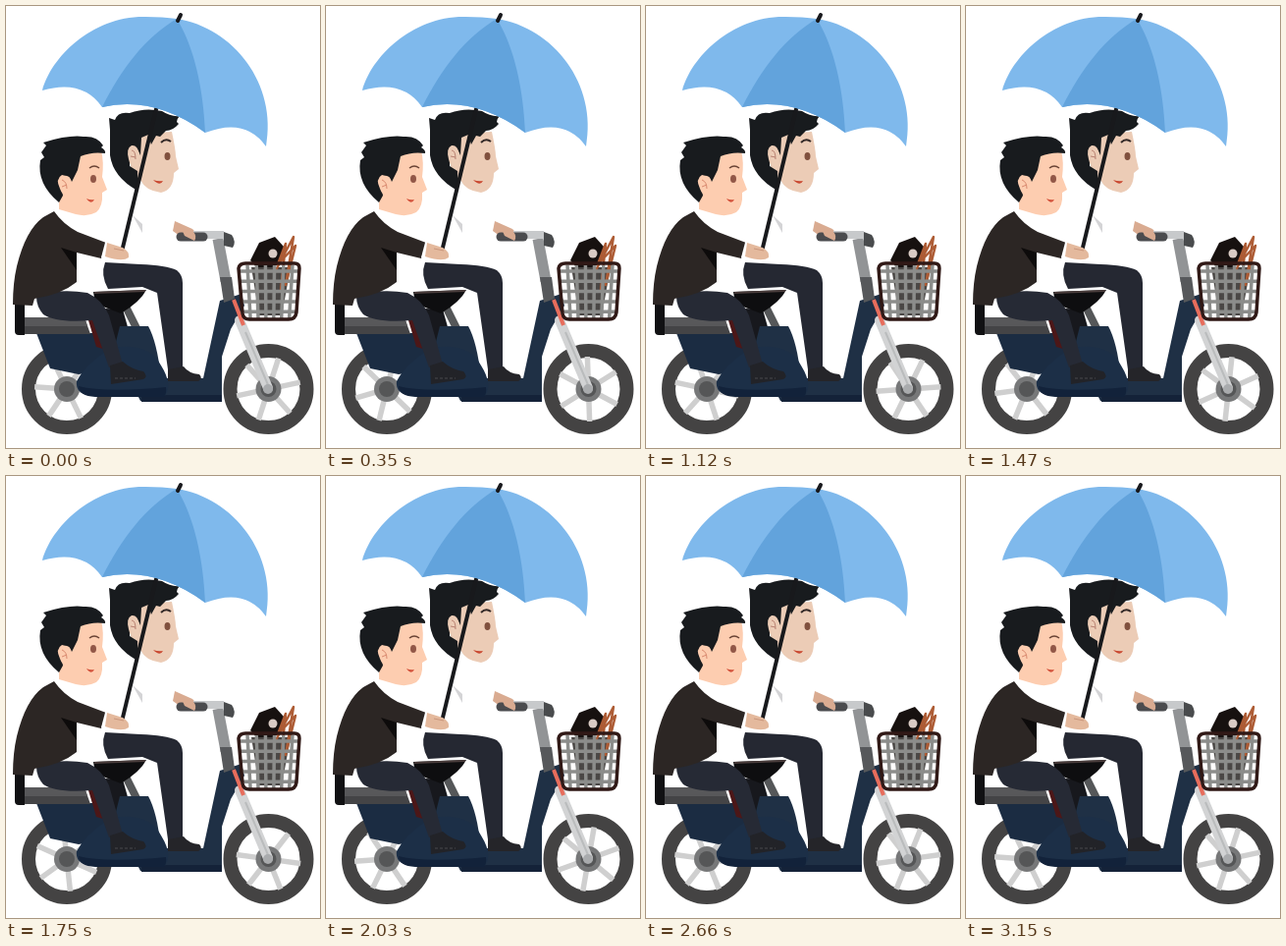
An HTML page that plays this animation: 320 px wide and 450 px high, repeating every 3.22 s.

```html
<!DOCTYPE html>
<html lang="en">
<head>
<meta charset="utf-8">
<title>Scooter ride</title>
<style>
html, body { margin: 0; width: 100%; height: 100%; overflow: hidden; background: #fff; }
svg { display: block; width: 100vw; height: 100vh; }
</style>
</head>
<body>
<svg viewBox="0 0 320 450" stroke-linejoin="round">
  <defs>
    <circle id="tyre" r="39" fill="#fff" stroke="#444343" stroke-width="14"/>
    <clipPath id="basketClip"><path d="M238 263H299L296 313Q295 319 288 319H248Q242 319 241 313Z"/></clipPath>
  </defs>

  <g id="wheels"></g>

  <!-- scooter -->
  <g id="scooter">
    <path d="M119 300L133 328" stroke="#555759" stroke-width="8"/>
    <path d="M31 333H101L112 368L74 375L45 369Z" fill="#1b2c42"/>
    <path d="M84 320L92 347L112 353V310Z" fill="#4c1718"/>
    <path d="M101 308L114 354L130 348L119 309Z" fill="#17181d"/>
    <path d="M116 326H145Q154 342 158 379H201L218 300L240 293L243 305L229 329L220 357V402H137L110 350Z" fill="#1f3045"/>
    <path d="M138 396H220V403H138Z" fill="#142238"/>
    <path d="M89 291L143 289Q137 301 117 313L91 303Z" fill="#0e0e10"/>
    <path d="M90 292L142 290" stroke="#483b3a" stroke-width="2"/>
    <path d="M15 317H80L86 334H20Q15 334 15 329Z" fill="#444446"/>
    <path d="M15 317H80L83 326H15Z" fill="#58585a"/>
    <path d="M9 302H19V335H13Q9 335 9 331Z" fill="#111113"/>
    <path d="M238 320L267 389" stroke="#d2d3d4" stroke-width="10" stroke-linecap="round"/>
    <path d="M244 332L268 388" stroke="#babcbd" stroke-width="2"/>
    <circle cx="267" cy="390" r="5" fill="#a9abad"/>
    <path d="M216 237L224 280" stroke="#929496" stroke-width="11"/>
    <path d="M218 276H230L233 298L222 302Z" fill="#56585b"/>
    <path d="M232 299L242 325" stroke="#e76d5c" stroke-width="4"/>
  </g>

  <!-- basket and its load -->
  <path d="M249 259L258 241L274 235L284 246L276 264L260 271Z" fill="#17110f"/>
  <circle cx="272" cy="252" r="4.5" fill="#d9cbc4"/>
  <path d="M250 266H290L281 315H258Z" fill="#4a4745"/>
  <path d="M275 269L293 235L285 284L295 244L277 263L285 242L280 290" fill="none" stroke="#ad5c35" stroke-width="2.5"/>
  <g clip-path="url(#basketClip)">
    <g id="weave" fill="none" stroke="#8c8d8b" stroke-width="3.5"></g>
  </g>
  <path d="M237 267Q238 262 244 262H294Q299 262 299 267L296 312Q295 319 288 319H248Q242 319 241 313Z" fill="none" stroke="#301916" stroke-width="3.5"/>

  <!-- driver -->
  <g id="driver">
    <path d="M129 181L156 188L169 216L181 223L174 236L147 231L138 266L100 264Q102 217 129 181Z" fill="#fff"/>
    <path d="M129 213L139 222V231Z" fill="#d4d4d6"/>
    <path d="M101 261L137 263Q163 264 174 269Q180 274 180 282V370H165L154 292L139 286L104 288Q96 274 101 261Z" fill="#252832"/>
    <path d="M165 370L181 367Q186 374 197 375Q201 379 196 382H165Z" fill="#252529"/>
    <path d="M126 143L137 130L169 128Q173 147 173 153L176 166L171 170Q171 187 158 190Q142 188 137 177L133 186Q126 174 126 143Z" fill="#ecccb6"/>
    <path d="M106 126L105 114L111 116Q114 107 126 109Q142 103 159 107Q168 113 177 112Q174 115 174 118L176 120Q170 127 163 127L157 133L153 132L148 141L145 131L138 134L137 152Q132 140 126 147L126 163L134 168V188Q109 174 106 152Z" fill="#181b1e"/>
    <path d="M136 151Q134 141 128 142Q122 145 125 156Q127 166 134 165Z" fill="#ecccb6"/>
    <path d="M128 147Q132 147 132 156M127 153L132 154" fill="none" stroke="#b98272"/>
    <path d="M158 139Q163 134 168 138" fill="none" stroke="#342a28" stroke-width="2"/>
    <ellipse cx="164.5" cy="153" rx="3" ry="4" fill="#80513f"/>
    <path d="M150 177Q155 179 160 178Q157 184 150 177Z" fill="#c9472f"/>
    <path d="M172 219L190 227Q197 233 193 239L181 237L170 229Z" fill="#d9ab91"/>
    <path d="M191 233H222" stroke="#c7c9cb" stroke-width="8"/>
    <path d="M178 235H201" stroke="#4a4b4e" stroke-width="9" stroke-linecap="round"/>
    <path d="M179 227L191 230Q195 234 192 239L182 234Z" fill="#d9ab91"/>
    <path d="M222 230L230 233Q235 240 231 246L222 244Z" fill="#494b4d"/>
  </g>

  <!-- umbrella -->
  <path d="M154 101L118 250" stroke="#18191c" stroke-width="4"/>
  <path d="M37 86C46 52 88 10 142 11Q160 11 174 13C232 22 277 80 265 143Q244 113 203 129Q151 91 98 103Q78 74 37 86Z" fill="#7fb9ec"/>
  <path d="M174 13C142 32 118 63 98 103Q151 91 203 129C201 84 192 42 174 13Z" fill="#62a3dc"/>
  <path d="M175 15L178 9" stroke="#18191c" stroke-width="4" stroke-linecap="round"/>

  <!-- drive cover and passenger -->
  <g id="passenger">
    <path d="M72 382Q82 363 108 348Q146 342 158 366Q170 385 162 397H90Q70 396 72 382Z" fill="#1c2f47"/>
    <path d="M74 387Q102 394 163 388Q164 394 161 398H91Q74 397 74 387Z" fill="#12223a"/>
    <path d="M31 296Q52 287 83 292Q98 299 105 315L119 365L105 368L88 320Q51 323 38 314Q31 306 31 296Z" fill="#262a35"/>
    <path d="M106 366L119 362Q128 370 140 372Q145 377 140 380L107 385Z" fill="#222328"/>
    <path d="M111 379H132" stroke="#48494c" stroke-dasharray="3 2"/>
    <path d="M55 209L80 214L88 237L72 240Z" fill="#fff"/>
    <path d="M49 209Q58 222 73 230L102 241L97 257L72 251V281Q56 294 29 298L27 305L7 304Q7 282 11 265Q20 228 38 215Z" fill="#2c2624"/>
    <path d="M56 246L72 251V269Z" fill="#0d0b0b"/>
    <path d="M102 237L107 240L104 257L97 256Z" fill="#fff"/>
    <path d="M103 241L119 246Q126 250 125 256Q119 261 101 255Z" fill="#e4b99d"/>
    <path d="M110 247L120 249" stroke="#c9967c"/>
    <path d="M54 173L70 149L97 147Q100 159 98 174L103 187L98 190Q99 204 92 210Q83 215 71 212L54 207Z" fill="#fdcdb0"/>
    <path d="M39 154L36 149L41 142L38 139Q64 131 79 133Q93 132 99 142L97 144Q102 147 101 150Q88 148 76 153L73 167L67 179Q64 169 55 175L58 193L54 200Q31 181 35 157Z" fill="#181b1e"/>
    <path d="M65 184Q64 172 57 172Q50 176 55 186Q58 195 65 193Z" fill="#fdcdb0"/>
    <path d="M57 177Q62 179 62 186M57 184L62 182" fill="none" stroke="#d9896f"/>
    <path d="M85 165Q90 161 95 165" fill="none" stroke="#6b4436" stroke-width="1.5"/>
    <ellipse cx="89" cy="176" rx="3" ry="4" fill="#925747"/>
    <path d="M82 196Q86 198 90 197Q87 203 82 196Z" fill="#d3523b"/>
  </g>
</svg>
<script>
const NS = "http://www.w3.org/2000/svg";
const LOOP = 3220, STEP = 70, TURN_PER_STEP = 8;
const $ = id => document.getElementById(id);

function add(parent, tag, attrs) {
  const node = document.createElementNS(NS, tag);
  for (const key in attrs) node.setAttribute(key, attrs[key]);
  return parent.appendChild(node);
}

function makeWheel(x, y, phase) {
  const wheel = add($("wheels"), "g", { transform: `translate(${x} ${y})` });
  add(wheel, "use", { href: "#tyre" });
  const spokes = add(wheel, "g", {});
  for (let i = 0; i < 6; i++) {
    add(spokes, "path", { d: "M8 0H33", stroke: "#cfcfcf", "stroke-width": 5.5, transform: `rotate(${i * 60})` });
  }
  add(wheel, "circle", { r: 13, fill: "#777879" });
  add(wheel, "circle", { r: 8, fill: "#555657" });
  return { spokes, phase };
}

const wheels = [makeWheel(62, 390, 4), makeWheel(267.5, 390, -12)];

for (let i = 0; i < 6; i++) {
  const x = 246 + i * 9.2;
  add($("weave"), "path", { d: `M${x} 264L${268 + (x - 268) * 0.86} 318` });
  if (i < 5) add($("weave"), "path", { d: `M238 ${270 + i * 10.3}H299` });
}

// The last pose equals the first, so one turn spans the whole loop.
function draw(time) {
  const angle = Math.floor((time % LOOP) / STEP) * TURN_PER_STEP;
  for (const { spokes, phase } of wheels) {
    spokes.setAttribute("transform", `rotate(${phase + angle})`);
  }
}

let start;
function tick(now) {
  start ??= now;
  draw(now - start);
  requestAnimationFrame(tick);
}
draw(0);
requestAnimationFrame(tick);
</script>
</body>
</html>
```
